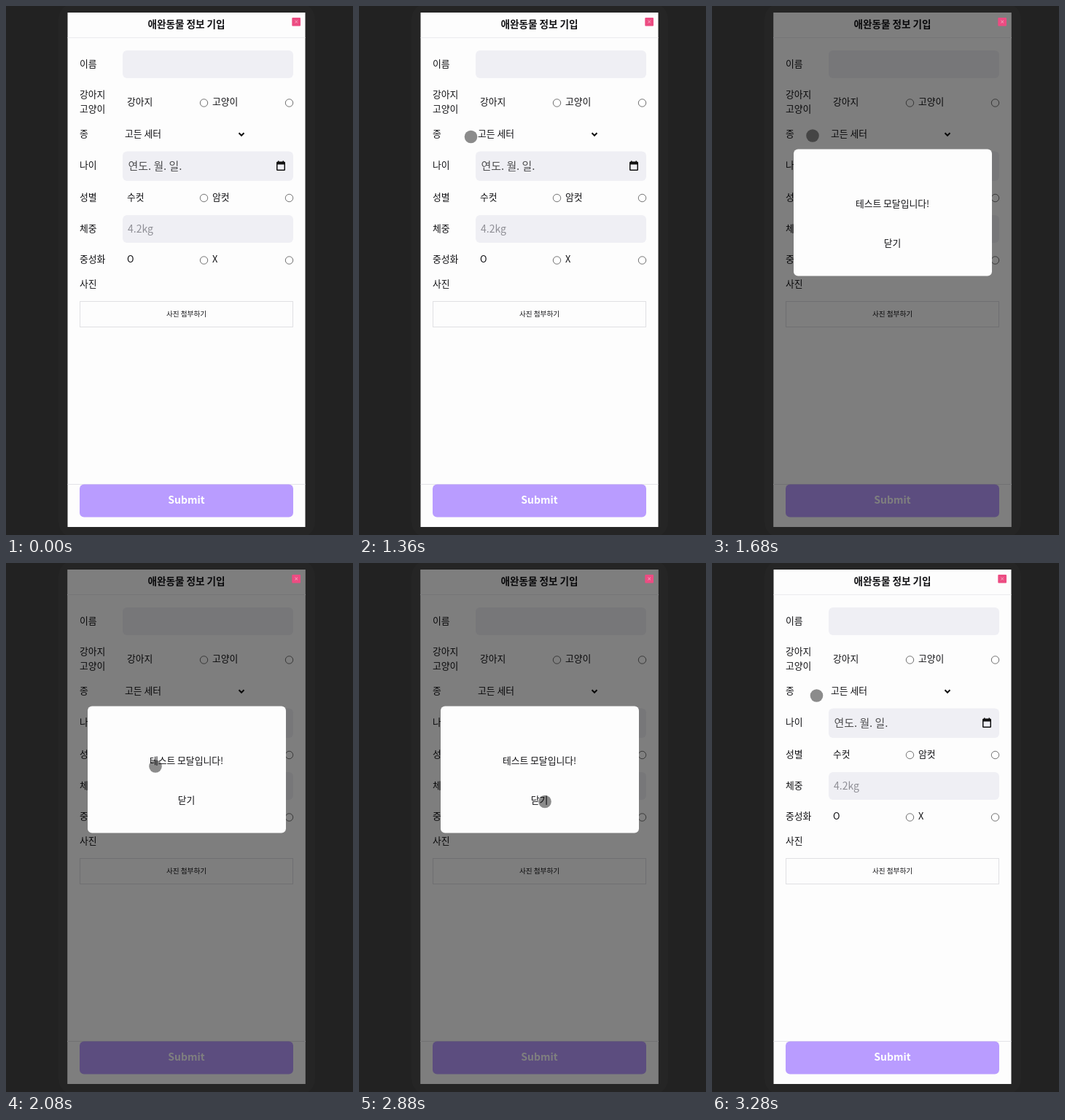
Recreate the animation shown at these times as an HTML page with a canvas. Size 476x726 px, loop 3360 ms.

```html
<!DOCTYPE html>
<html lang="ko">
<head>
<meta charset="utf-8">
<title>애완동물 정보 기입</title>
<style>
html, body { margin: 0; width: 100%; height: 100%; overflow: hidden; background: #222; }
canvas { display: block; }
</style>
</head>
<body>
<canvas id="stage" width="476" height="726"></canvas>
<script>
const ctx = document.getElementById('stage').getContext('2d');
const LOOP = 3360, TICK = 80;
const OPEN = 1440, CLOSE = 2960, FLASH = 240;
const FONT = '"Noto Sans CJK KR", "Noto Sans CJK", "Noto Sans", sans-serif';
const INK = '#111114';

// time, x, y of the pointer
const PATH = [
  [320, 457, 262], [480, 335, 240], [640, 206, 227], [720, 184.5, 224.5],
  [960, 172, 205], [1360, 153.5, 179.5], [1440, 144.5, 177], [1680, 138, 178],
  [1840, 155, 204], [2080, 205, 279], [2240, 233, 316], [2320, 246, 324],
  [2400, 256, 328], [2880, 255, 327.5], [2960, 254, 326],
  [3040, 240, 306], [3120, 200, 252], [3200, 162, 203], [3280, 143.5, 182]
];

function box(x, y, w, h, r, fill) {
  ctx.fillStyle = fill;
  ctx.beginPath();
  ctx.roundRect(x, y, w, h, r);
  ctx.fill();
}

function outline(x, y, w, h, color, width = 1) {
  ctx.strokeStyle = color;
  ctx.lineWidth = width;
  ctx.strokeRect(x, y, w, h);
}

function line(points, color, width) {
  ctx.strokeStyle = color;
  ctx.lineWidth = width;
  ctx.beginPath();
  points.forEach(([x, y]) => ctx.lineTo(x, y));
  ctx.stroke();
}

function disc(x, y, r) {
  ctx.beginPath();
  ctx.arc(x, y, r, 0, Math.PI * 2);
}

// y is the optical middle of the line of text
function text(str, x, y, { size = 12.8, color = INK, weight = 400, align = 'left' } = {}) {
  ctx.font = `${weight} ${size}px ${FONT}`;
  ctx.fillStyle = color;
  ctx.textAlign = align;
  ctx.fillText(str, x, y + size * 0.38);
}

function radio(x, y) {
  disc(x, y, 5.2);
  ctx.fillStyle = '#fff';
  ctx.fill();
  ctx.strokeStyle = '#707070';
  ctx.lineWidth = 1;
  ctx.stroke();
}

function choice(y, first, second) {
  text(first, 166, y);
  text(second, 283, y);
  radio(271.5, y + 1.5);
  radio(388.5, y + 1.5);
}

function calendar(x, y) {
  box(x, y + 1, 12, 12.5, 1.5, '#111');
  box(x + 1.5, y + 5, 9, 7, 0, '#efeff4');
  box(x + 2, y, 1.5, 2, 0, '#111');
  box(x + 8.5, y, 1.5, 2, 0, '#111');
}

function drawForm() {
  box(84.5, 9, 326, 706, 0, '#fdfdfd');
  text('애완동물 정보 기입', 247.5, 25, { size: 13.6, weight: 700, align: 'center' });
  box(84.5, 43, 326, 1, 0, '#ececee');

  [['이름', 79], ['강아지', 121], ['고양이', 141], ['종', 175.5], ['나이', 218.5],
   ['성별', 262], ['체중', 305], ['중성화', 347.5], ['사진', 381]]
    .forEach(([label, y]) => text(label, 101, y));

  [[61, 38], [199.5, 40.5], [287, 38]]
    .forEach(([y, h]) => box(160, y, 234, h, 6, '#efeff4'));

  choice(131.5, '강아지', '고양이');
  choice(262, '수컷', '암컷');
  choice(347.5, 'O', 'X');

  text('고든 세터', 163, 175.5);
  line([[319.5, 174.3], [323, 177.8], [326.5, 174.3]], '#111', 2);
  text('연도. 월. 일.', 167.5, 219, { size: 14.9, color: '#4e4e50' });
  calendar(371, 212.5);
  text('4.2kg', 167, 305.5, { size: 14, color: '#8f8f96' });

  outline(101.5, 405.5, 292, 35, '#e0e0e3');
  text('사진 첨부하기', 247.5, 422, { size: 9.6, align: 'center' });

  box(84.5, 656, 326, 1, 0, '#e4e4e8');
  box(101, 656.5, 293, 45, 6, '#b99cff');
  text('Submit', 247.5, 677.5, { size: 14, color: '#fff', weight: 700, align: 'center' });
}

function drawCloseIcon() {
  box(392.3, 16, 11.7, 11.5, 1, '#ec4c82');
  line([[396.4, 19.8], [400, 23.4]], '#f5a6c0', 1);
  line([[400, 19.8], [396.4, 23.4]], '#f5a6c0', 1);
}

function drawModal() {
  box(112, 196.5, 272, 174, 6, '#fdfdfd');
  text('테스트 모달입니다!', 247.5, 271.5, { align: 'center' });
  text('닫기', 247.5, 325, { align: 'center' });
}

// Outlines of the parts that have just been re-rendered
function drawHighlights(withModal) {
  const teal = '#7ed3cd';
  outline(85.2, 10, 325, 704.5, teal, 1.5);
  line([[85, 43], [410, 43]], '#c4dcda', 1);
  line([[85, 45], [410, 45]], teal, 1.2);
  line([[85, 655.5], [410, 655.5]], '#c4dcda', 1.2);
  line([[85, 657], [410, 657]], teal, 1.2);
  line([[96.5, 18], [99, 18], [99, 34.5], [96.5, 34.5]], teal, 1.3);
  outline(387.5, 11.5, 21.5, 21.5, '#a9dcd8', 1.5);
  outline(391.5, 15.5, 13, 12.5, '#d9c9d0', 1);
  if (withModal) {
    outline(111, 195.8, 273.5, 175.2, '#d5eeec', 1.5);
    outline(112.5, 197, 270.5, 172.5, teal, 1);
  }
}

function drawMoveCursor(x, y) {
  ctx.save();
  ctx.translate(x, y);
  ctx.lineJoin = 'round';
  ctx.beginPath();
  for (let i = 0; i < 4; i++) {
    ctx.lineTo(-0.8, -0.8);
    ctx.lineTo(-0.8, -4);
    ctx.lineTo(-2.7, -4);
    ctx.lineTo(0, -6.8);
    ctx.lineTo(2.7, -4);
    ctx.lineTo(0.8, -4);
    ctx.lineTo(0.8, -0.8);
    ctx.rotate(Math.PI / 2);
  }
  ctx.closePath();
  ctx.strokeStyle = '#fff';
  ctx.lineWidth = 2;
  ctx.stroke();
  ctx.fillStyle = '#000';
  ctx.fill();
  ctx.restore();
}

function drawTouch(x, y, pressed) {
  disc(x, y, pressed ? 9.8 : 8.8);
  ctx.fillStyle = 'rgba(0,0,0,.45)';
  ctx.fill();
  if (!pressed) return;
  ctx.strokeStyle = '#b8b8b8';
  ctx.lineWidth = 1.6;
  ctx.stroke();
}

function pointerAt(t) {
  const next = PATH.findIndex(p => p[0] >= t);
  if (next <= 0) return PATH[0].slice(1);
  const [t0, x0, y0] = PATH[next - 1], [t1, x1, y1] = PATH[next];
  const k = (t - t0) / (t1 - t0);
  return [x0 + (x1 - x0) * k, y0 + (y1 - y0) * k];
}

function draw(t) {
  const within = (start, length) => t >= start && t < start + length;
  const modal = t >= OPEN && t < CLOSE;

  ctx.fillStyle = '#222';
  ctx.fillRect(0, 0, 476, 726);
  box(72, -4, 352, 734, 22, '#252525');
  drawForm();
  if (modal) box(84.5, 9, 326, 706, 0, 'rgba(0,0,0,.5)');
  drawCloseIcon();
  if (modal) drawModal();
  if (within(OPEN, FLASH) || within(CLOSE, FLASH)) drawHighlights(modal);

  if (t < PATH[0][0]) return;
  const [x, y] = pointerAt(t);
  if (t < 800) drawMoveCursor(x, y);
  else drawTouch(x, y, within(OPEN, TICK) || within(CLOSE, TICK));
}

const start = performance.now();
function loop() {
  const t = (performance.now() - start) % LOOP;
  draw(Math.floor(t / TICK) * TICK);
  requestAnimationFrame(loop);
}
loop();
</script>
</body>
</html>
```
